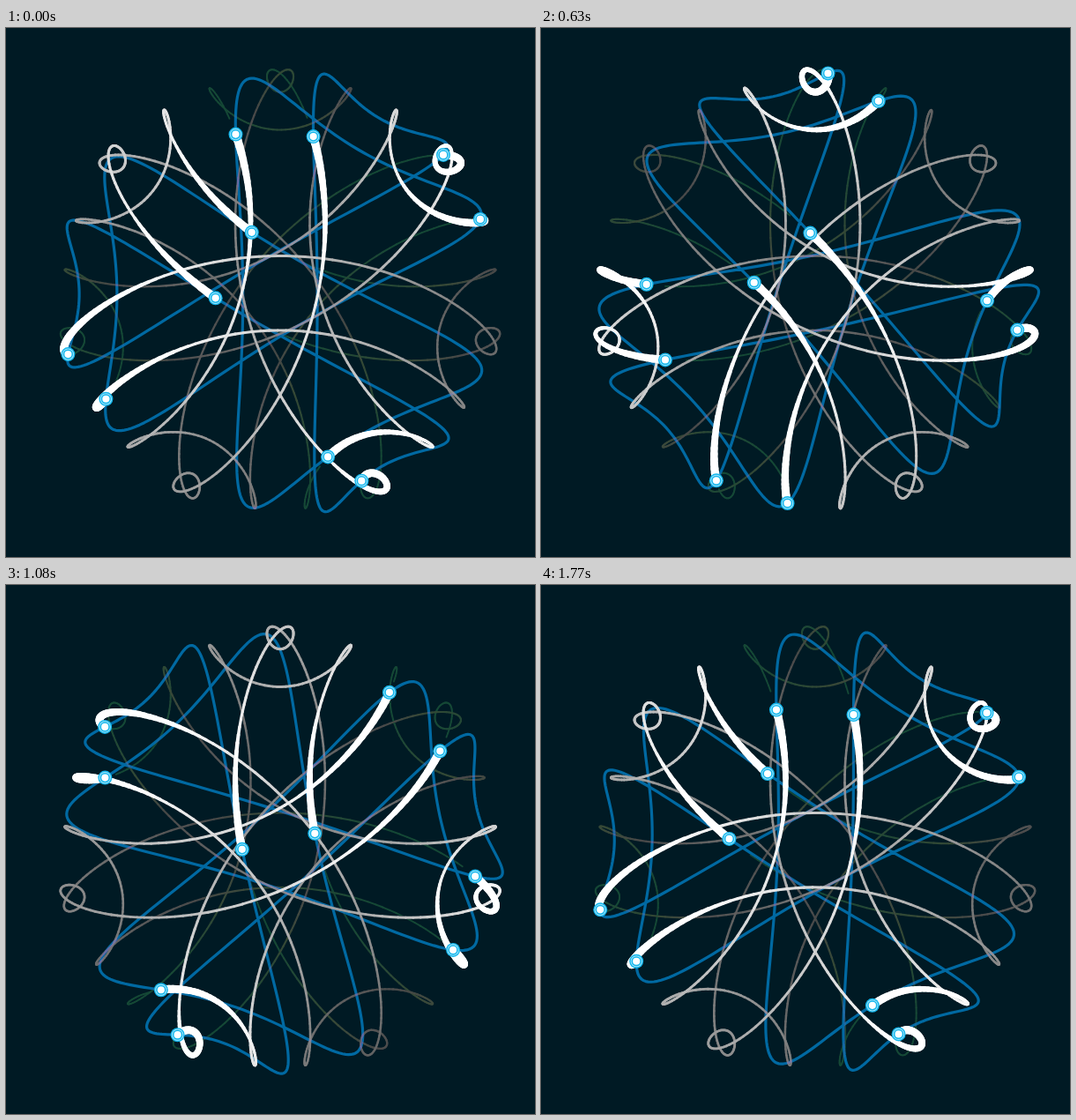
Write an HTML page with a canvas that moves like this. It is 600 by 600 pixels and loops after 1.8 s.

```html
<!DOCTYPE html>
<html lang="en">
<head>
<meta charset="utf-8">
<title>Orbits</title>
<style>
html, body { margin: 0; width: 100%; height: 100%; overflow: hidden; background: #001a24; }
canvas { display: block; }
</style>
</head>
<body>
<canvas id="stage" width="600" height="600"></canvas>
<script>
const ctx = document.getElementById('stage').getContext('2d');
const TAU = Math.PI * 2;
const LOOP = 1800, STEP = 30, DOTS = 5, PHASE = 447;
const TRAIL = 1770, SLICE = 10;

// Amplitudes of the harmonics m = -3..2, which turn at 3 + 7m along
// a dot's path (sevenfold) and at -2 - 3m around the ring (threefold).
const looped = [-1.6, -44, 145.8, 139.5, -9.2, -2.6];
const cusped = [-0.8, -53.7, 77.5, 170.6, -5.3, -3.2];
const orbits = [looped, cusped];

function point(amps, theta, phi = 0) {
  let x = 311, y = 300.6;
  amps.forEach((amp, i) => {
    const m = i - 3;
    const a = (3 + 7 * m) * theta - (2 + 3 * m) * phi;
    x += amp * Math.sin(a);
    y -= amp * Math.cos(a);
  });
  return [x, y];
}

function angle(time) {
  return TAU * (time - PHASE) / (LOOP * DOTS);
}

// White fades to grey and ends in a dark green; u runs from head to tail.
function shade(u) {
  const level = Math.min(255, 290 * (1 - u) ** 1.1);
  return `rgb(${Math.max(level, 20)}, ${Math.max(level, 72)}, ${Math.max(level, 53)})`;
}

function thickness(u) {
  return 3.5 - 1.7 * u + 6 * Math.max(0, 1 - u / 0.15);
}

function drawRing(amps, time) {
  const theta = angle(time);
  ctx.beginPath();
  for (let i = 0; i < 360; i++) ctx.lineTo(...point(amps, theta, TAU * i / 360));
  ctx.closePath();
  ctx.strokeStyle = '#0069a2';
  ctx.lineWidth = 3.2;
  ctx.stroke();
}

// The trail covers a fixed time but tapers with the distance travelled.
function drawTrail(amps, time) {
  const path = [];
  let run = 0;
  for (let age = 0; age <= TRAIL; age += SLICE) {
    const [x, y] = point(amps, angle(time - age));
    const last = path[path.length - 1];
    if (last) run += Math.hypot(x - last.x, y - last.y);
    path.push({ x, y, run });
  }
  for (let i = path.length - 1; i > 0; i--) {
    const a = path[i], b = path[i - 1];
    const u = b.run / run;
    ctx.beginPath();
    ctx.moveTo(a.x, a.y);
    ctx.lineTo(b.x, b.y);
    ctx.strokeStyle = shade(u);
    ctx.lineWidth = thickness(u);
    ctx.stroke();
  }
}

function disc(x, y, r, color) {
  ctx.beginPath();
  ctx.arc(x, y, r, 0, TAU);
  ctx.fillStyle = color;
  ctx.fill();
}

function drawDot(amps, time) {
  const [x, y] = point(amps, angle(time));
  disc(x, y, 8, '#12b6ec');
  disc(x, y, 6.6, '#a5e4f9');
  disc(x, y, 5.6, '#12b6ec');
  disc(x, y, 4.1, '#fff');
}

function eachDot(time, paint) {
  for (const amps of orbits) {
    for (let j = 0; j < DOTS; j++) paint(amps, time + j * LOOP);
  }
}

function draw(time) {
  ctx.globalCompositeOperation = 'source-over';
  ctx.fillStyle = '#001a24';
  ctx.fillRect(0, 0, 600, 600);
  ctx.lineCap = ctx.lineJoin = 'round';
  orbits.forEach(amps => drawRing(amps, time));
  ctx.globalCompositeOperation = 'lighten';
  eachDot(time, drawTrail);
  ctx.globalCompositeOperation = 'source-over';
  eachDot(time, drawDot);
}

let start = null, shown = 0;
function tick(now) {
  if (start === null) start = now;
  const time = Math.floor(((now - start) % LOOP) / STEP) * STEP;
  if (time !== shown) draw(shown = time);
  requestAnimationFrame(tick);
}
draw(0);
requestAnimationFrame(tick);
</script>
</body>
</html>
```
